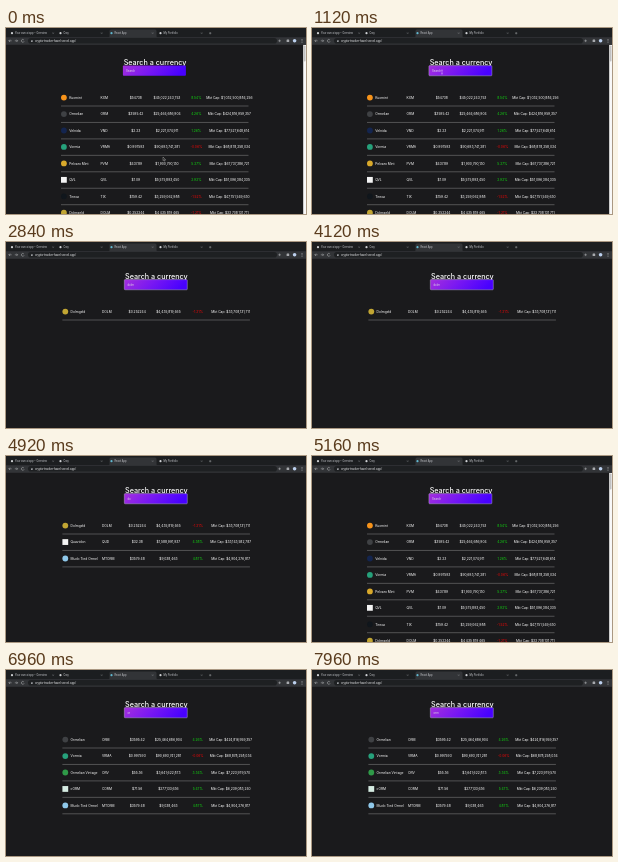
An HTML page that plays this animation: 300x186 px, repeating every 8000 ms.

```html
<!DOCTYPE html>
<html lang="en">
<head>
<meta charset="utf-8">
<title>Currency search</title>
<style>
  html, body { margin: 0; width: 100%; height: 100%; overflow: hidden; background: #1a1a1c; }
  svg { display: block; width: 100%; height: 100%; font-family: Inter, "Open Sans", sans-serif; }
  .row text { font-size: 3.3px; fill: #fff; }
  .row .mid { text-anchor: middle; }
  .row .up { fill: #11d811; }
  .row .down { fill: #f00606; }
  .chrome text { font-size: 2.6px; fill: #c4c6ca; font-family: Roboto, sans-serif; }
</style>
</head>
<body>
<svg id="stage" viewBox="0 0 300 186">
  <defs>
    <linearGradient id="field" x1="0" y1="0" x2="1" y2="0.15">
      <stop offset="0" stop-color="#a42fdc"/>
      <stop offset=".48" stop-color="#7918f2"/>
      <stop offset="1" stop-color="#4801ff"/>
    </linearGradient>
  </defs>
  <rect width="300" height="186" fill="#1a1a1c"/>
  <g id="page">
    <text x="149" y="36.5" font-size="7.2" font-weight="500" fill="#fff" text-anchor="middle">Search a currency</text>
    <rect id="box" x="116.9" y="37.6" width="63" height="10.2" rx=".8" fill="url(#field)" stroke-width=".4"/>
    <text id="query" x="120" y="43.7" font-size="2.75" fill="#e2e2e2"></text>
    <g id="list"></g>
  </g>
  <g id="bar">
    <rect x="297.2" y="16.8" width="2.8" height="169.2" fill="#f8f8f8"/>
    <rect x="297.7" y="17.4" width="1.8" height="16" rx=".9" fill="#c1c1c1"/>
  </g>
  <g class="chrome" id="chrome">
    <rect width="300" height="9.5" fill="#1c1e20"/>
    <path d="M102 9.5q1.5 0 1.5-1.5V3q0-1.5 1.5-1.5h44q1.5 0 1.5 1.5v5q0 1.5 1.5 1.5z" fill="#323437"/>
    <rect y="9.2" width="300" height="7.6" fill="#323437"/>
    <rect x="22" y="10" width="249" height="5.6" rx="2.8" fill="#1e2022"/>
    <path d="M5.6 12.8H2.8m1.2-1.2-1.2 1.2 1.2 1.2M8.8 12.8h2.8m-1.2-1.2 1.2 1.2-1.2 1.2M17.9 12a1.4 1.4 0 1 0 .2 1.3M273.6 11.5v2.6m-1.3-1.3h2.6" fill="none" stroke="#b8babd" stroke-width=".5"/>
    <rect x="25" y="12.3" width="1.7" height="1.6" rx=".2" fill="#9a9ca0"/>
    <text x="29" y="13.8" style="font-size:2.95px;fill:#e4e5e7">crypto-tracker-hazel.vercel.app/</text>
    <rect x="280.6" y="11.5" width="2.6" height="2.6" rx=".4" fill="#a8aaae"/>
    <circle cx="288.6" cy="12.8" r="1.8" fill="#bcd0ee"/>
    <path d="M296 11.4v.01m0 1.4v.01m0 1.4v.01" stroke="#c4c6ca" stroke-width=".7" stroke-linecap="round"/>
  </g>
  <path id="arrow" d="M0 0v3.6l.9-.8.6 1.4.6-.3-.6-1.3h1.1z" fill="#111" stroke="#fff" stroke-width=".3"/>
  <path id="beam" d="M-.8-1.9h1.6M0-1.9v3.8m-.8 0h1.6" fill="none" stroke="#fff" stroke-width=".35"/>
</svg>
<script>
const NS = "http://www.w3.org/2000/svg";
const LOOP = 8000, FIRST = 69.6, PITCH = 16.45;
const $ = id => document.getElementById(id);

// name, ticker, price, volume, change, market cap, badge colour, square badge
const coins = [
  ["Kuxmint", "KXM", "$54738", "$45,022,243,753", "8.54%", "$1,032,500,884,256", "#f7931a"],
  ["Ormelian", "ORM", "$3595.42", "$25,464,686,904", "4.26%", "$424,816,959,357", "#3f4144"],
  ["Velnida", "VND", "$2.23", "$2,221,074,911", "1.26%", "$77,527,648,614", "#14254f"],
  ["Vormia", "VRMA", "$0.997593", "$90,693,741,281", "-0.06%", "$68,878,258,034", "#26a17b"],
  ["Pelvaro Mint", "PVM", "$437.89", "$1,900,790,130", "5.27%", "$67,737,386,721", "#d9a92b"],
  ["QVL", "QVL", "$1.09", "$5,575,893,450", "2.92%", "$51,096,384,335", "#f4f4f4", 1],
  ["Tirexa", "TIX", "$159.42", "$3,259,062,988", "-1.52%", "$47,751,549,630", "#10161c"],
  ["Dolmgeld", "DOLM", "$0.252244", "$4,435,819,465", "-1.21%", "$33,708,131,711", "#c2a633"],
  ["Quavidon", "QUD", "$32.38", "$1,588,991,937", "4.38%", "$33,143,582,787", "#f4f4f4", 1],
  ["Ormelian Vintage", "ORV", "$55.36", "$3,641,622,873", "3.34%", "$7,223,979,570", "#2f9a48"],
  ["cORM", "CORM", "$71.56", "$277,133,636", "5.47%", "$6,239,083,240", "#d5ebe2", 1],
  ["Mudo Tied Ormel", "MTORM", "$3579.48", "$9,038,463", "4.87%", "$4,904,276,817", "#8fc8ea"]
];

// search text from each moment on
const typing = [
  [0, ""], [1720, "d"], [1840, "do"], [2040, "dol"], [2200, "dolm"],
  [4800, "dol"], [4880, "do"], [4960, "d"], [5040, ""],
  [6720, "o"], [6880, "or"], [7040, "orm"]
];

function add(parent, tag, attrs, text) {
  const el = document.createElementNS(NS, tag);
  for (const key in attrs) el.setAttribute(key, attrs[key]);
  if (text) el.textContent = text;
  return parent.appendChild(el);
}

function makeRow([name, ticker, price, volume, change, cap, color, square]) {
  const g = add($("list"), "g", { class: "row" });
  const cell = (x, text, cls = "") => add(g, "text", { x, y: 1.2, class: cls }, text);
  if (square) add(g, "rect", { x: 55, y: -2.9, width: 5.8, height: 5.8, fill: color });
  else add(g, "circle", { cx: 57.9, cy: 0, r: 2.9, fill: color });
  cell(63.2, name);
  cell(94.5, ticker);
  cell(129.8, price, "mid");
  cell(161, volume, "mid");
  cell(190.3, change, "mid " + (change[0] === "-" ? "down" : "up"));
  cell(223.3, "Mkt Cap: " + cap, "mid");
  add(g, "path", { d: "M55 8.4H242.5", stroke: "#d7d7d7", "stroke-width": .3 });
  return { g, key: name.toLowerCase() };
}

const rows = coins.map(makeRow);

[[9, "Your own ai app – Overview"], [57.5, "Cray"], [108.5, "React App"], [157.5, "My Portfolio"]].forEach(([x, label], i) => {
  add($("chrome"), "circle", { cx: x - 3, cy: 5.2, r: 1.1, fill: i === 2 ? "#61b8d0" : "#d0d2d5" });
  add($("chrome"), "text", { x, y: 6.1 }, label);
  add($("chrome"), "path", { d: `M${x + 37.5} 4.5l1.3 1.3m0-1.3-1.3 1.3`, stroke: "#9a9ca0", "stroke-width": .35 });
});
add($("chrome"), "path", { d: "M203 5.2h2.4m-1.2-1.2v2.4", stroke: "#b8babd", "stroke-width": .4 });

const ease = p => p * p * (3 - 2 * p);
const clamp = p => Math.min(1, Math.max(0, p));

function draw(t) {
  const query = typing.filter(([at]) => at <= t).pop()[1];
  $("query").textContent = query || "Search";

  let count = 0;
  for (const { g, key } of rows) {
    const shown = key.includes(query);
    g.style.display = shown ? "" : "none";
    if (shown) g.setAttribute("transform", `translate(0 ${FIRST + PITCH * count++})`);
  }
  const scrolls = count > 7;
  $("bar").style.display = scrolls ? "" : "none";
  $("page").setAttribute("transform", `translate(${scrolls ? 0 : 1.4} 0)`);
  $("box").setAttribute("stroke", t >= 1000 ? "#c4c0dc" : "none");

  const p = ease(clamp((t - 150) / 700));
  const x = 157 - 27 * p, y = 129 - 85 * p;
  const inside = y < 48;
  for (const [id, on] of [["arrow", !inside], ["beam", inside]]) {
    $(id).style.display = on && t < 1720 ? "" : "none";
    $(id).setAttribute("transform", `translate(${x} ${y})`);
  }
}

const start = performance.now();
function tick() {
  draw((performance.now() - start) % LOOP);
  requestAnimationFrame(tick);
}
tick();
</script>
</body>
</html>
```
